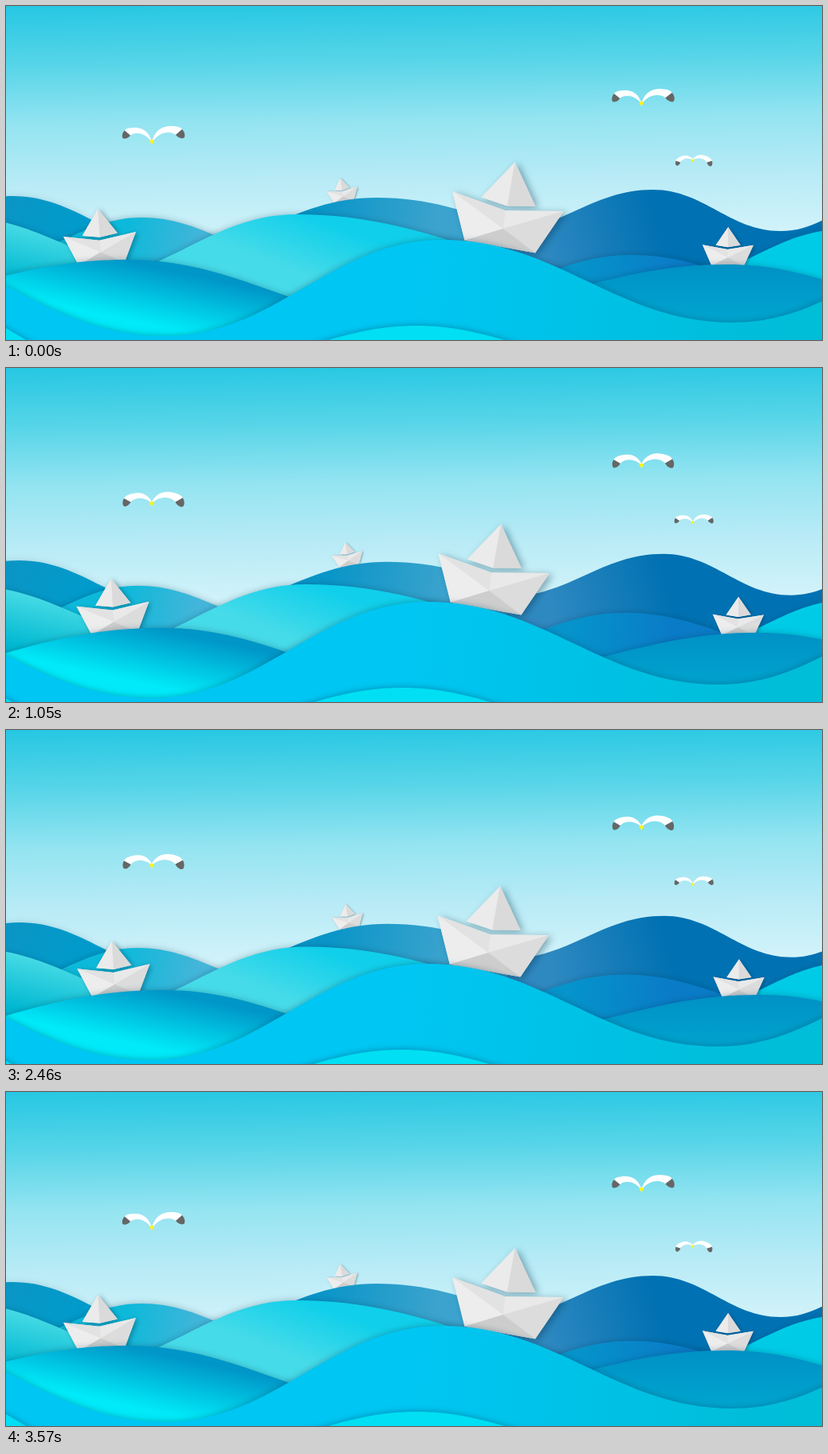
An HTML page with a canvas that plays this animation: 1024x420 px, repeating every 3.6 s.

```html
<!DOCTYPE html>
<html lang="en">
<head>
<meta charset="utf-8">
<title>Paper boats</title>
<style>
  html, body { margin: 0; width: 100%; height: 100%; overflow: hidden; }
  canvas { display: block; }
</style>
</head>
<body>
<canvas id="stage" width="1024" height="420"></canvas>
<script>
const ctx = document.getElementById('stage').getContext('2d');
const LOOP = 3600, STEP = 30, LAST = LOOP / STEP - 1, FLOOR = 470;
const rad = deg => deg * Math.PI / 180;

// Evenly spaced colours along a line
function blend(x0, y0, x1, y1, ...colors) {
  const g = ctx.createLinearGradient(x0, y0, x1, y1);
  colors.forEach((c, i) => g.addColorStop(i / (colors.length - 1), c));
  return g;
}

function local(x, y, turn, size, paint) {
  ctx.save();
  ctx.translate(x, y);
  ctx.rotate(rad(turn));
  ctx.scale(size, size);
  paint();
  ctx.restore();
}

function fill(path, color) {
  ctx.fillStyle = color;
  ctx.fill(path);
}

function shadow(alpha, blur, dx = 0, dy = 0) {
  ctx.shadowColor = `rgba(0,45,70,${alpha})`;
  ctx.shadowBlur = blur;
  ctx.shadowOffsetX = dx;
  ctx.shadowOffsetY = dy;
}

// A crest with a trough on either side
const hill = (x, y, left, right, depth) =>
  [[x - left, y + depth], [x, y], [x + right, y + depth]];

// Crests and troughs joined by level-ended S curves, filled downwards
function swell(turns) {
  const path = new Path2D();
  let [px, py] = turns[0];
  path.moveTo(px, FLOOR);
  path.lineTo(px, py);
  for (const [x, y] of turns.slice(1)) {
    const pull = (x - px) * 0.4;
    path.bezierCurveTo(px + pull, py, x - pull, y, x, y);
    [px, py] = [x, y];
  }
  path.lineTo(px, FLOOR);
  path.closePath();
  return path;
}

function wave(dx, dy, color, shade, turns) {
  const path = swell(turns);
  return p => local(dx * p, dy * p, 0, 1, () => {
    if (shade) shadow(shade, 9);
    fill(path, color);
  });
}

const sail = new Path2D('M0-50L-34 1L0 6L35 0Z');
const hull = new Path2D('M-71 0L-1 12L71 0L45 58L-45 58Z');
const faces = [
  ['M0-50L-34 1L0 6Z', '#ebebeb'],
  ['M0-50L0 6L35 0Z', '#dadada'],
  ['M-71 0L-1 12L0 35Z', '#e2e2e2'],
  ['M-71 0L0 35L-45 58Z', '#ededed'],
  ['M-1 12L71 0L0 35Z', '#e9e9e9'],
  ['M71 0L45 58L0 35Z', '#dcdcdc'],
  ['M0 35L45 58L-45 58Z', '#cdcdcd']
].map(([d, color]) => [new Path2D(d), color]);

const boat = (x, y, dx, dy, size, tilt) => p =>
  local(x + dx * p, y + dy * p, tilt, size, () => {
    shadow(0.4, 10 * size, 4 * size, 2 * size);
    fill(sail, '#e4e4e4');
    fill(hull, '#e4e4e4');
    ctx.shadowColor = 'transparent';
    faces.forEach(face => fill(...face));
  });

const feather = new Path2D('M0 2C3-13 12-19 24-19C31-19 36-18 38-15L30-8C24-13 9-13 0 2Z');
const tip = new Path2D('M38-15C41-12 42-8 41-5C39-2 33-4 30-8Z');
const body = new Path2D('M0-3L3 0L0 4L-3 0Z');

// Wings turn about a shoulder above the body
function wing(side, angle) {
  ctx.save();
  ctx.scale(side, Math.abs(side));
  ctx.translate(0, -7);
  ctx.rotate(rad(angle));
  ctx.translate(0, 7);
  fill(feather, '#fff');
  fill(tip, '#666');
  ctx.restore();
}

const bird = (x, y, size, angle, swing) => p => local(x, y, 0, size, () => {
  wing(-0.9, angle + swing * p);
  wing(1, angle + swing * p);
  fill(body, '#fbf21a');
});

const sky = blend(0, 0, 4, 300, '#26c7e3', '#57d5e8', '#94e4f1', '#b8ebf6', '#d3f3fa');

// Back to front
const scene = [
  boat(421.5, 230, 11, 4.5, 0.278, -8.7),
  wave(22, 4.5, blend(390, 250, 540, 270, '#0895c8', '#3ba3cd'), 0, hill(465, 241, 270, 325, 70)),
  wave(22, 4.5, blend(670, 300, 815, 260, '#2f89c1', '#0071b2'), 0,
    [[615, 285], [812, 231], [972, 283], [1122, 231]]),
  wave(14, 5, blend(0, 240, 90, 290, '#0a96c5', '#009bcb'), 0.15, hill(8, 239, 200, 202, 61)),
  wave(-8, 13, blend(150, 280, 245, 300, '#0cb9da', '#44b5d9'), 0.3, hill(170, 266, 180, 195, 49)),
  wave(22, 15, blend(10, 275, -5, 340, '#45dae5', '#00b8d1'), 0.25, hill(-60, 265, 260, 270, 70)),
  wave(18, 17, blend(375, 262, 350, 330, '#10cfea', '#46dbe9'), 0.3, hill(365, 262, 275, 440, 83)),
  wave(18, 17, '#00cbe7', 0.2, hill(1050, 281, 215, 215, 63)),
  wave(-14, -9, blend(715, 320, 845, 330, '#0594cb', '#0a7bc7'), 0.3, hill(785, 313, 225, 245, 50)),
  boat(906, 300.5, 22, 16.5, 0.45, 0.6),
  wave(66, 13, blend(900, 325, 900, 400, '#0091c5', '#00a6d0'), 0.3, hill(905, 325, 365, 295, 55)),
  boat(117.5, 287, 28, 16.5, 0.642, -3.8),
  wave(72, 13, blend(160, 322, 145, 392, '#0096c7', '#00eaf9'), 0.3, hill(152, 319, 430, 354, 75)),
  boat(630, 245.5, -30, 0, 1, 10.1),
  wave(-30, 0, blend(560, 0, 1020, 60, '#00c6f3', '#00bdd8'), 0.35,
    [[-190, 294], [200, 415], [547, 294], [912, 398], [1235, 294]]),
  wave(-30, 0, '#00dff3', 0.4, hill(515, 402, 245, 245, 43)),
  wave(-30, 0, '#00dff3', 0.4, hill(-100, 372, 220, 220, 78)),
  bird(183, 170, 1, 0, 21),
  bird(797.5, 122, 1, 3, 14),
  bird(862, 194, 0.63, 24, -26)
];

function draw(time) {
  const step = Math.floor((time % LOOP) / STEP);
  const p = 1 - Math.abs(1 - 2 * step / LAST);
  ctx.fillStyle = sky;
  ctx.fillRect(0, 0, 1024, 420);
  scene.forEach(part => part(p));
}

const start = performance.now();
function tick() {
  draw(performance.now() - start);
  requestAnimationFrame(tick);
}
tick();
</script>
</body>
</html>
```
